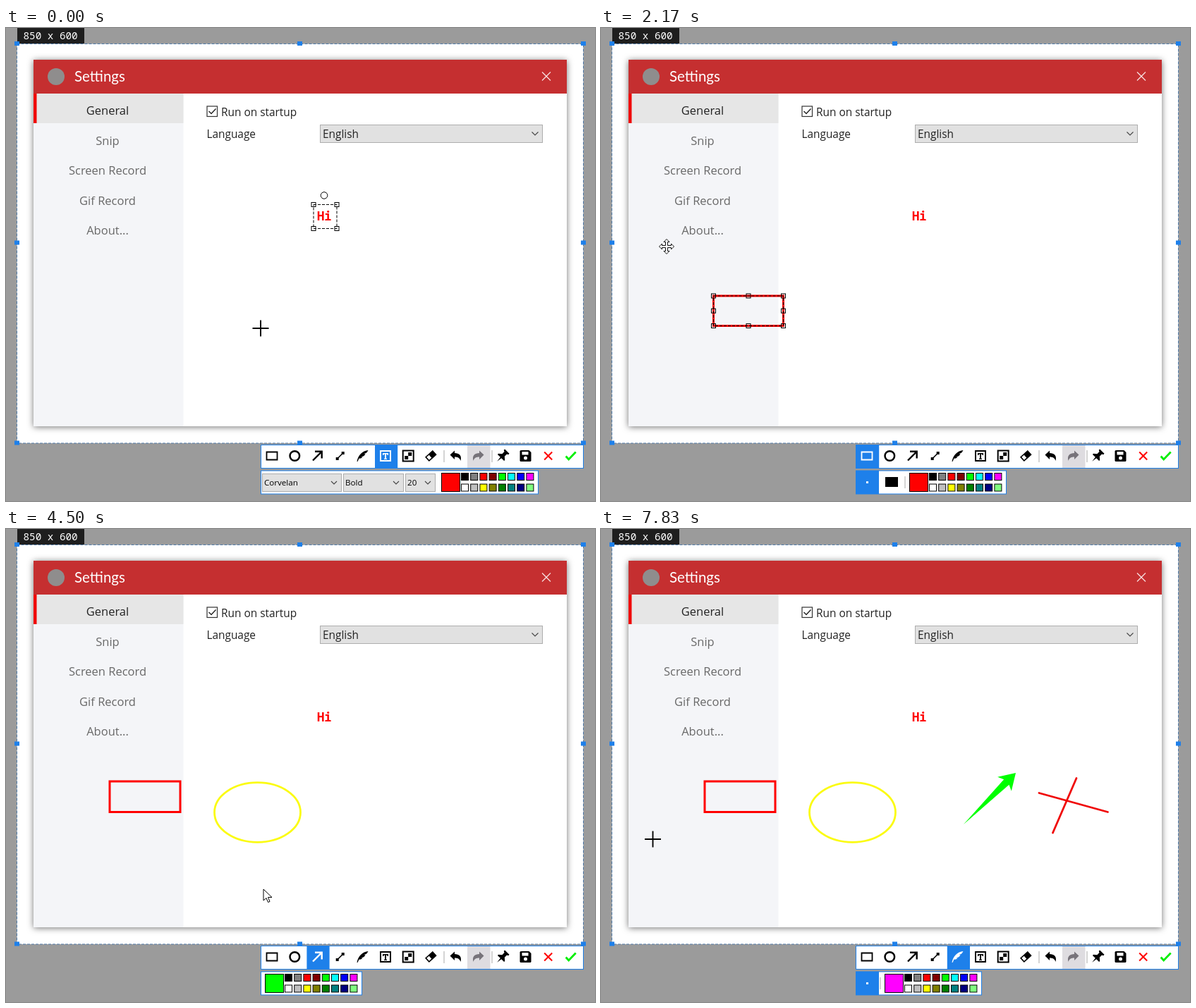
These frames come from a looping animation (835 by 671 pixels, 8 s). An HTML page:

```html
<!DOCTYPE html>
<html lang="en">
<head>
<meta charset="utf-8">
<title>Annotation tools</title>
<style>
html, body { margin: 0; width: 100%; height: 100%; overflow: hidden; background: #9b9b9b; }
svg { display: block; width: 835px; height: 671px; font-family: "Open Sans", "Noto Sans", sans-serif; }
.mono { font-family: "Noto Sans Mono", "DejaVu Sans Mono", monospace; }
.menu { font-size: 16.5px; fill: #686868; text-anchor: middle; }
.form { font-size: 15.4px; fill: #222; }
.small { font-size: 11.6px; fill: #000; }
.window { filter: drop-shadow(0 1px 5px rgba(0, 0, 0, .55)); }
.line { fill: none; stroke: currentColor; }
.dash { fill: none; stroke: #000; stroke-dasharray: 4 2; }
</style>
</head>
<body>
<svg viewBox="0 0 835 671">
  <rect x="15.5" y="22.5" width="803" height="566.5" fill="#fff"/>
  <rect x="15.5" y="22.5" width="803" height="566.5" fill="none" stroke="#507ba9" stroke-dasharray="4 2"/>
  <rect x="16" width="95" height="22" fill="#1e1e1e"/>
  <text class="mono" x="24.5" y="16" font-size="14.3" fill="#fff">850 x 600</text>
  <g id="grips" fill="#1e80ea"></g>

  <rect class="window" x="39" y="45" width="756" height="520" fill="#fff"/>
  <rect x="39" y="93" width="212.5" height="472" fill="#f4f5f8"/>
  <rect x="39" y="45" width="756" height="48" fill="#c52f30"/>
  <circle cx="71" cy="69" r="12" fill="#8f8d8d"/>
  <text x="97" y="76" font-size="20.5" fill="#fff" style="font-family:Lato,sans-serif">Settings</text>
  <path d="M760 62.500l12 12M772 62.500l-12 12" stroke="#f6dcdc" stroke-width="1.300"/>
  <rect x="39" y="93" width="212.5" height="42" fill="#e6e6e6"/>
  <rect x="39" y="93" width="4.500" height="42" fill="#f00808"/>
  <g class="menu">
    <text x="144" y="122.500" fill="#222">General</text>
    <text x="144" y="165.500">Snip</text>
    <text x="144" y="208">Screen Record</text>
    <text x="144" y="250.500">Gif Record</text>
    <text x="144" y="293">About...</text>
  </g>
  <g class="form">
    <rect x="285" y="111" width="14.500" height="14.500" fill="#fff" stroke="#333" stroke-width="1.200"/>
    <path d="M287.500 118l3.500 3.500 6.500-7" fill="none" stroke="#222" stroke-width="1.400"/>
    <text x="305" y="124.500">Run on startup</text>
    <text x="284.500" y="156">Language</text>
    <rect x="445.500" y="137.500" width="315" height="25" fill="#e1e1e1" stroke="#adadad"/>
    <text x="449" y="156">English</text>
    <path d="M745.500 147.500l4.500 4.500 4.500-4.500" fill="none" stroke="#444" stroke-width="1.100"/>
  </g>
  <text class="mono" x="441" y="273" font-size="17.200" font-weight="600" fill="#f00">Hi</text>
  <g id="scene"></g>
</svg>
<script>
const scene = document.getElementById('scene');
const STEPS = 48, LOOP = 8000;
const BLUE = '#1e80ea';

const box = (x, y, w, h, fill, extra = '') =>
  `<rect x="${x}" y="${y}" width="${w}" height="${h}" fill="${fill}" ${extra}/>`;
const outlined = (x, y, w, h, fill, stroke) => box(x, y, w, h, fill, `stroke="${stroke}"`);
const stroke = (d, width, extra = '') => `<path class="line" d="${d}" stroke-width="${width}" ${extra}/>`;
const solid = d => `<path d="${d}" fill="currentColor"/>`;
const handles = (points, size = 6) => points.map(([x, y]) =>
  outlined(x - size / 2, y - size / 2, size, size, 'none', '#000')).join('');
const lerp = (a, b, f) => a + (b - a) * f;
const progress = (k, from, to) => Math.min(1, Math.max(0, (k - from) / (to - from)));
// Last value whose start step has been reached.
const pick = (k, ...pairs) => pairs.filter(([from]) => k >= from).pop()[1];

document.getElementById('grips').innerHTML = [15.5, 416.5, 818.5].flatMap(x =>
  [22, 304.5, 588.5].map(y => x === 416.5 && y === 304.5 ? '' : box(x - 3.5, y - 3, 7, 6, BLUE))).join('');

const undo = 'M-8-1.500L-1.500-7.500V-4C5-4 9-.500 7 7C5.500 2.500 2.500 1.500-1.500 1.500V5Z';
const icons = [
  [377, stroke('M-7.500-5.500h15v11h-15z', 1.8)],
  [409.3, stroke('M-6.800 0a6.800 6.800 0 1 0 13.600 0a6.800 6.800 0 1 0-13.600 0', 2.5)],
  [441.5, stroke('M-6.500 6.500L6-6M-3.500-6.200H6.200V3.500', 2.4)],
  [473.7, stroke('M-4 4L4-4', 1.6) + solid('M-6 2h4v4h-4zM2-6h4v4h-4z')],
  [505.5, solid('M-8 8C-6-2 0-7 8-8C7-6 6-5 5-4L2-3L4-2.500C3-1 2 0 0 1L-2 1L0 2C-1 3-3 4-5 3.500L-7 8Z')],
  [538, stroke('M-7-7h14v14h-14z', 2) + solid('M-4-4h8v3h-1l-1-1.500h-1v6l1 .5v1h-4v-1l1-.5v-6h-1l-1 1.500h-1z')],
  [570.2, stroke('M-7.500-7.500h15v15h-15z', 2) + solid('M0-5h5v5H0zM-5 0h5v5h-5z')],
  [602.3, `<g transform="rotate(-42)">${stroke('M-6.500-3.500h13v7h-13z', 1.6)}${solid('M-1-4h8v8h-8z')}</g>`],
  [637.5, solid(undo)],
  [669.5, `<g transform="scale(-1 1)" color="#77737a">${solid(undo)}</g>`],
  [704, `<g transform="rotate(45)">${solid('M-4.500-9h9v2l-2 1v4.500l4 3.500v1.500h-5.500L0 11l-1-7.500h-5.500V2l4-3.500V-6l-2-1z')}</g>`],
  [736.5, solid('M-8-6.500q0-1.500 1.500-1.500H5l3 3V6.500q0 1.500-1.500 1.500h-13q-1.500 0-1.500-1.500z') +
    box(-5, -6, 9, 4.5, '#fff') + `<circle cy="3" r="2.500" fill="#fff"/>`],
  [768.7, `<g color="#f00">${stroke('M-5.500-5.500l11 11M5.500-5.500l-11 11', 2)}</g>`],
  [800.7, `<g color="#0e0">${stroke('M-7 .5l4 4.500L7-5.500', 2.8)}</g>`]
];

function toolbar(active) {
  return outlined(361.5, 591.5, 457, 33, '#fff', BLUE) +
    box(654, 592, 32.5, 32, '#dedce0') +
    box(362 + 32.2 * active, 592, 32.2, 32, BLUE) +
    [620.5, 688.5].map(x => box(x, 599, 1, 17, '#aaa')).join('') +
    icons.map(([x, art], i) =>
      `<g transform="translate(${x} 607)" color="${i === active ? '#fff' : '#000'}">${art}</g>`).join('');
}

const swatches = [
  '#000 #808080 #f00 #800000 #0f0 #0ff #00f #f0f'.split(' '),
  '#fff #c0c0c0 #ff0 #808000 #008000 #008080 #000080 #80ff80'.split(' ')
];

function palette(x, color) {
  return outlined(x + .5, 631.5, 26, 26, color, '#000') +
    swatches.map((row, r) => row.map((c, i) =>
      outlined(x + 28.5 + 13.2 * i, 631.5 + 15.5 * r, 10, 10, c, '#000')).join('')).join('');
}

function combo(x, width, label) {
  return outlined(x + .5, 632.5, width, 25, '#e1e1e1', '#adadad') +
    `<text class="small" x="${x + 3}" y="649">${label}</text>` +
    stroke(`M${x + width - 14} 643l4 4 4-4`, 1.1, 'style="color:#444"');
}

const paletteX = { text: 617, shape: 437, arrow: 367, line: 402 };

function panel(kind, color) {
  const x = paletteX[kind];
  let parts = '';
  if (kind === 'text') parts = combo(363, 112, 'Corvelan') + combo(478, 85, 'Bold') + combo(566, 42, '20');
  if (kind === 'shape' || kind === 'line')
    parts = box(362, 628, 32, 33, BLUE) + box(376, 643, 3, 3, '#fff') +
      box(x - 6.5, 636, 1, 17, '#aaa');
  if (kind === 'shape') parts += box(403, 637, 18, 14, '#000');
  return outlined(361.5, 628, x - 224.5 - (kind === 'text' ? 0 : 0), 33, '#fff', BLUE) .replace(
    /width="[^"]*"/, `width="${x + 137.5 - 361.5}"`) + parts + palette(x, color);
}

function textFrame() {
  return '<path class="dash" d="M436 250.500h33v34h-33z"/>' +
    handles([[436, 250.5], [469, 250.5], [436, 284.5], [469, 284.5]]) +
    '<circle cx="451" cy="237.500" r="4.800" fill="#fff" stroke="#000"/>';
}

function frameHandles(x, y, w, h) {
  const points = [0, .5, 1].flatMap(i => [0, .5, 1].map(j => [i, j]))
    .filter(([i, j]) => i !== .5 || j !== .5);
  return `<path class="dash" d="M${x} ${y}h${w}v${h}h${-w}z"/>` +
    handles(points.map(([i, j]) => [x + w * i, y + h * j]));
}

function rectangle(k) {
  const grow = progress(k, 5, 7), drag = progress(k, 9, 13), drop = progress(k, 14, 15);
  if (!grow) return '';
  const x = lerp(159.5, 147, drop), y = lerp(lerp(392, 380, drag), 358, drop);
  const w = 99 * grow + drop, h = 42.5 * grow + drop;
  return outlined(x, y, w, h, 'none', '#f00').replace('/>', ' stroke-width="3"/>') +
    (k >= 7 && k < 17 ? frameHandles(x, y, w, h) : '');
}

function ellipse(k) {
  const f = progress(k, 22, 24);
  if (!f) return '';
  const rx = 61 * f, ry = 42.3 * f;
  return `<ellipse cx="${295.5 + rx}" cy="${359.7 + ry}" rx="${rx}" ry="${ry}" fill="none" stroke="#fbfb12" stroke-width="2.800"/>` +
    (f === 1 && k < 26 ? frameHandles(295.5, 359.7, 122, 84.6) : '');
}

function segmentHandles(x1, y1, x2, y2) {
  return `<path class="dash" d="M${x1} ${y1}L${x2} ${y2}"/>` + handles([[x1, y1], [x2, y2]], 5);
}

function arrow(k) {
  const f = progress(k, 29, 31);
  if (!f) return '';
  const dx = 74 * f, dy = -73 * f, length = Math.hypot(dx, dy);
  const angle = Math.atan2(dy, dx) * 180 / Math.PI;
  const neck = length - 18.5, barb = length - 22.5;
  return `<path transform="translate(514 419) rotate(${angle})" fill="#0f0"
    d="M0 0L${neck}-5.200L${barb}-14L${length} 0L${barb} 14L${neck} 5.200Z"/>` +
    (f === 1 && k < 35 ? segmentHandles(514, 419, 514 + dx, 419 + dy) : '');
}

function segment(k, from, to, until, x1, y1, x2, y2) {
  const f = progress(k, from, to);
  if (!f) return '';
  const x = lerp(x1, x2, f), y = lerp(y1, y2, f);
  return `<path d="M${x1} ${y1}L${x} ${y}" stroke="#f00808" stroke-width="2.800" stroke-linecap="round"/>` +
    (k < until ? segmentHandles(x1, y1, x, y) : '');
}

// Pointer waypoints: step, x, y.
const route = [
  [0, 361, 426], [2, 305, 488], [4, 91.5, 409], [5, 128, 322], [7, 210, 352], [9, 108, 325],
  [13, 93, 310], [14, 93, 310], [15, 83, 292], [17, 327, 487], [19, 398, 521], [21, 214.5, 320.5],
  [22, 237, 292], [24, 335, 360], [26, 353, 488], [27, 365, 511], [29, 417, 341], [31, 470, 283],
  [33, 384.5, 560], [35, 380, 491], [37, 372, 512], [38, 503, 303], [39, 581, 327],
  [40, 545.5, 283], [42, 518, 346], [44, 411, 487], [45, 429, 511], [47, 73.5, 440]
];
const fin = 'M0-10.500l4 4h-2.500v5';
const pointers = {
  cross: '<path d="M-11.500 0h23M0-11.500v23" stroke="#fff" stroke-opacity=".5" stroke-width="3.500"/>' +
    '<path d="M-11.500 0h23M0-11.500v23" stroke="#000" stroke-width="1.900"/>',
  move: `<path d="${fin}h5V-4l4 4-4 4V1.500h-5v5H4l-4 4-4-4h2.500v-5h-5V4l-4-4 4-4v2.500h5v-5H-4Z" fill="#fff" stroke="#111"/>`,
  arrow: '<path d="M0 0v16l4-3.500 2.500 6 2.500-1-2.500-6H12Z" fill="#fff" stroke="#000"/>'
};

function pointer(k) {
  const next = Math.max(1, route.findIndex(([step]) => step >= k));
  const [a, x1, y1] = route[next - 1], [b, x2, y2] = route[next];
  const f = progress(k, a, b);
  const kind = pick(k, [0, 'cross'], [2, 'arrow'], [3, 'cross'], [9, 'move'], [16, 'cross'],
    [17, 'arrow'], [20, 'cross'], [26, 'arrow'], [28, 'cross'], [35, 'arrow'],
    [38, 'cross'], [44, 'arrow'], [46, 'cross']);
  return `<g transform="translate(${lerp(x1, x2, f)} ${lerp(y1, y2, f)})">${pointers[kind]}</g>`;
}

function draw(k) {
  const tool = pick(k, [0, 5], [2, 0], [17, 1], [26, 2], [35, 3], [44, 4]);
  const kind = pick(k, [0, 'text'], [2, 'shape'], [26, 'arrow'], [36, 'line']);
  const color = pick(k, [0, '#f00'], [19, '#ff0'], [27, '#0f0'], [37, '#f00'], [45, '#f0f']);
  scene.innerHTML = (k < 2 ? textFrame() : '') + rectangle(k) + ellipse(k) + arrow(k) +
    segment(k, 38, 39, 41, 621, 374.5, 718.5, 401.5) +
    segment(k, 40, 42, 44, 674, 353.5, 640.5, 431) +
    toolbar(tool) + panel(kind, color) + pointer(k);
}

const start = performance.now();
let shown = -1;
function tick() {
  const time = (performance.now() - start) % LOOP;
  const k = Math.floor((time + 3.5) * STEPS / LOOP) % STEPS;
  if (k !== shown) draw(shown = k);
  requestAnimationFrame(tick);
}
tick();
</script>
</body>
</html>
```
